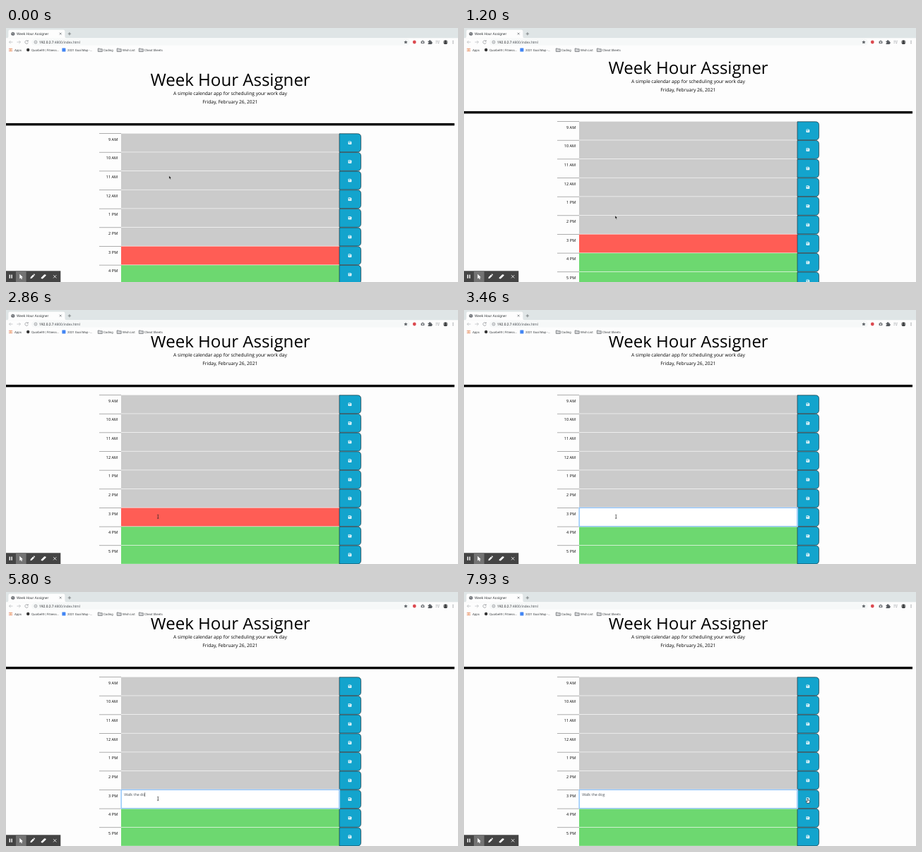
Write an HTML page that moves like this. It is 640 px wide and 360 px high and loops after 8 s.

```html
<!DOCTYPE html>
<html lang="en">
<head>
<meta charset="utf-8">
<title>Week Hour Assigner</title>
<style>
html, body { margin: 0; width: 100%; height: 100%; overflow: hidden; background: #fdfdfd; }
svg { display: block; width: 640px; height: 360px; }
text { font-family: "Open Sans", "Noto Sans", sans-serif; text-rendering: geometricPrecision; white-space: pre; }
#bar text { font-family: Roboto, Inter, sans-serif; fill: #3c4043; }
.mid { text-anchor: middle; }
.end { text-anchor: end; }
.ico { fill: none; stroke: #5f6368; stroke-width: .7; }
.pale { stroke: #b4b6b9; }
</style>
</head>
<body>
<svg viewBox="0 0 640 360">
  <g id="page"></g>
  <g id="bar"></g>
  <g id="tools"></g>
  <g id="mouse">
    <path id="arrow" d="M0 0V4.9L1.1 3.9 1.9 5.7 2.8 5.3 2 3.6H3.5Z" fill="#111" stroke="#fff" stroke-width=".4"/>
    <path id="beam" d="M-1.1-2.7Q0-2.7 0-2V2Q0 2.7-1.1 2.7M1.1-2.7Q0-2.7 0-2M0 2Q0 2.7 1.1 2.7M-.6.8H.6" fill="none" stroke="#222" stroke-width=".6"/>
    <path id="hand" d="M-.6 0Q0-.7.6 0V2L2.7 2.6Q3.2 2.9 3 3.8L2.3 6H-1L-2.6 3.6Q-2.4 2.8-1.6 3.2L-.6 4Z" fill="#fff" stroke="#111" stroke-width=".6"/>
  </g>
</svg>
<script>
const $ = id => document.getElementById(id);
const LOOP = 8000, TICK = 1000 / 15;
const TOP = 149.2, PITCH = 26.65, ACTIVE = 6;
const HOURS = ["9 AM", "10 AM", "11 AM", "12 AM", "1 PM", "2 PM", "3 PM", "4 PM", "5 PM"];
const NAME = "Week Hour Assigner";

const text = (x, y, size, str, extra = "") =>
  `<text x="${x}" y="${y}" font-size="${size}" ${extra}>${str}</text>`;
const rect = (x, y, w, h, fill, extra = "") =>
  `<rect x="${x}" y="${y}" width="${w}" height="${h}" fill="${fill}" ${extra}/>`;
const dot = (x, y, r, fill) => `<circle cx="${x}" cy="${y}" r="${r}" fill="${fill}"/>`;
const icon = (d, extra = "") => `<path class="ico" d="${d}" ${extra}/>`;
const paleIcon = d => `<path class="ico pale" d="${d}"/>`;

function row(label, i) {
  const y = TOP + PITCH * i, mid = y + 13.5;
  const color = i < ACTIVE ? "#cbcbcb" : i === ACTIVE ? "#ff5d55" : "#6dd870";
  return `<g>${rect(132, y, 31, .7, "#8c8c8c")}
    ${text(158.2, y + 10.6, 5.6, label, 'class="end"')}
    ${rect(163, y + .4, 309, 26, color, i === ACTIVE ? 'id="field"' : "")}
    <path d="M472 ${y + .6}h25.6q5 0 5 5v15.9q0 5-5 5h-25.6z" fill="#13a4cd" stroke="#22343b" stroke-width=".7"/>
    <g transform="translate(484.6 ${mid - 2.3})"><path d="M.5 0H3.4L4.6 1.2V4.1Q4.6 4.6 4.1 4.6H.5Q0 4.6 0 4.1V.5Q0 0 .5 0Z" fill="#fff"/>
    ${rect(.7, .7, 2.4, 1.1, "#13a4cd")}${dot(2.3, 3.1, .65, "#13a4cd")}</g></g>`;
}

const fieldY = TOP + PITCH * ACTIVE;
$("page").innerHTML =
  text(317.6, 82, 24.05, NAME, 'class="mid"') +
  text(317.5, 95.2, 6.68, "A simple calendar app for scheduling your work day", 'class="mid"') +
  text(317.3, 107.2, 6.68, "Friday, February 26, 2021", 'class="mid"') +
  rect(0, 134.9, 635, 3.4, "#000") +
  HOURS.map(row).join("") +
  `<g id="focus">${rect(162.9, fieldY + .2, 309.2, 26.4, "none", 'stroke="#bfdeff" stroke-width="1.6"')}
   ${rect(163.3, fieldY + .5, 308.4, 25.8, "#fff", 'stroke="#6fb3f5" stroke-width=".7"')}</g>` +
  text(167.2, 318, 5.34, "", 'id="entry" fill="#495057"') +
  rect(0, 313.2, .6, 5.9, "#222", 'id="caret"');

const folder = x => icon(`M${x - 3} 29h2.2l.8.8h3v3.6h-6z`, 'style="fill:#d5d6d8"');
let grid = "";
for (let i = 0; i < 9; i++)
  grid += rect(4.4 + i % 3 * 1.6, 28.9 + (i / 3 | 0) * 1.6, 1.1, 1.1, i % 2 ? "#e8a33d" : "#e2574c");

$("bar").innerHTML =
  rect(0, 0, 640, 14.5, "#dfe5e6") +
  `<path d="M1 14.6Q3.4 14.4 3.4 12V5Q3.4 2.6 5.8 2.6H81Q83.4 2.6 83.4 5V12Q83.4 14.4 85.8 14.6Z" fill="#fdfdfd"/>` +
  dot(9.8, 8.2, 2.5, "#5f6368") +
  icon("M8 7.4h2l.6 1.4-1.4 1.2M10.5 6.2l1 1.1", 'style="stroke:#fff;stroke-width:.5"') +
  text(15, 10, 5, NAME) +
  icon("M75.8 6.7l2.8 2.8m0-2.8l-2.8 2.8M87.7 8.2h4.4M89.9 6v4.4") +
  rect(0, 14.5, 640, 22.5, "#fdfdfd") +
  rect(36, 15.6, 536, 9, "#f6f8f8", 'rx="4.5"') +
  paleIcon("M9.5 20h-5m2.1-2.1L4.5 20l2.1 2.1") +
  paleIcon("M15.5 20h5m-2.1-2.1l2.1 2.1-2.1 2.1") +
  icon("M31 18.6A2.3 2.3 0 1 0 31.4 20.6M31.3 17.2v1.7h-1.8", 'style="stroke:#8a8d91"') +
  icon("M44 20a2 2 0 1 1-4 0a2 2 0 1 1 4 0M42 19.7v1.4M42 18.7v.4", 'style="stroke-width:.5"') +
  text(47, 21.8, 4.95, '192.0.2.7<tspan fill="#55595e">:4800/index.html</tspan>', 'style="fill:#202124"') +
  `<path d="M566 17.4l.8 1.7 1.8.2-1.3 1.2.4 1.8-1.7-.9-1.7.9.4-1.8-1.3-1.2 1.8-.2z" fill="#5f6368"/>` +
  dot(578.3, 20, 2.4, "#dc4a50") +
  rect(587.6, 18.4, 4.8, 3.6, "#6a6e73", 'rx=".6"') + rect(589, 17.7, 2, 1, "#6a6e73") + dot(590, 20.2, 1, "#fdfdfd") +
  `<path d="M597.6 18.4h1.6q0-1.3 1-1.3t1 1.3h1.6v1.5q1.1 0 1.1 1t-1.1 1v1.1h-5.2v-1.4q1.2 0 1.2-.8t-1.2-.8z" fill="#55595e"/>` +
  paleIcon("M608.4 18.2h3.4M608.4 19.8h3.4M608.4 21.4h1.6M612.9 21.4V18.2h1.2") + dot(612.2, 21.5, .8, "#b4b6b9") +
  dot(622.3, 20, 3.1, "#8b8c8c") + `<path d="M619.9 22q.4-1.6 1.5-1.6a1.4 1.6 0 1 1 1.8 0q1.4.1 1.6 1.6-2.4 2-4.9 0z" fill="#3c3e40"/>` +
  [18.2, 20, 21.8].map(y => dot(633, y, .55, "#5f6368")).join("") +
  grid +
  dot(31.2, 31, 2.2, "#333") +
  rect(79.4, 28.5, 5, 5, "#4285f4", 'rx=".5"') +
  [133.3, 160.2, 191.3].map(folder).join("") +
  [[12, "Apps"], [36, "Quorbel® | Fitness..."], [87, "2021 Goal Map -..."], [138, "Coding"], [165, "Wish List"], [196, "Cheat Sheets"]]
    .map(([x, s]) => text(x, 32.7, 4.35, s)).join("");

$("tools").innerHTML =
  rect(0, 344.3, 77.3, 15.7, "#444") +
  rect(14, 344.3, 14.6, 15.7, "#737373") +
  rect(4.6, 349.6, 1.4, 5.2, "#fff") + rect(7.4, 349.6, 1.4, 5.2, "#fff") +
  `<g fill="#fff"><path d="M19.3 348.8v6.6l1.6-1.3 1 2.2 1.1-.5-1-2.2h2z"/>
   <path d="M34.4 355.2l.5-2.1 3.5-3.5 1.6 1.6-3.5 3.5zM38.9 349.1l.5-.5q.5-.3.9.1l.6.6q.4.4 0 .9l-.5.5z"/>
   <path d="M49.8 353.7l4.2-4.2q.4-.4 1-.3l1.4.5q.7.4.1 1.2l-4.1 4.2q-.5.5-1.1.3l-1.3-.5q-.9-.4-.2-1.2z"/></g>` +
  `<path d="M67.1 350.2l4.2 4.2m0-4.2l-4.2 4.2" stroke="#fff" stroke-width=".8"/>`;

// Each step: time, then values.
const scroll = [[1000, 0], [1067, 1.67], [1133, 8], [1200, 17], [1267, 24], [1333, 28], [1400, 29]];
const moves = [
  [0, 230.8, 209.2], [150, 226, 224], [300, 219.5, 246], [450, 215.2, 261], [600, 213.9, 265.7],
  [1600, 213.9, 265.7], [1880, 213.6, 281], [2133, 213.2, 293.6],
  [2400, 213.2, 293.6], [2467, 214.8, 293.2], [2800, 214.8, 293.2], [2867, 215.3, 293],
  [7067, 215.3, 293], [7250, 245, 292], [7450, 345, 291], [7650, 448, 292], [7800, 483, 293], [7933, 486.7, 293.3]
];
const phrase = "Walk the dog";
const keys = [4460, 4730, 4800, 4930, 5130, 5200, 5330, 5460, 5530, 5660, 5800, 6000];
const FOCUS = 2960;

function at(steps, t, col) {
  const i = steps.findIndex(s => s[0] > t);
  if (i === 0) return steps[0][col];
  if (i < 0) return steps[steps.length - 1][col];
  const a = steps[i - 1], b = steps[i];
  return a[col] + (b[col] - a[col]) * (t - a[0]) / (b[0] - a[0]);
}
const show = (id, on) => $(id).setAttribute("visibility", on ? "visible" : "hidden");

function draw(time) {
  const t = Math.min(119, Math.floor((time + 6.8) / TICK)) * TICK;
  $("page").setAttribute("transform", `translate(0 ${-at(scroll, t, 1)})`);

  const focused = t >= FOCUS + 20;
  show("focus", focused);
  $("focus").setAttribute("stroke-opacity", Math.max(0, Math.min(1, (t - FOCUS) / 200)));
  show("field", !focused);

  const count = keys.filter(k => k <= t).length;
  $("entry").textContent = phrase.slice(0, count);
  const since = t - (count ? keys[count - 1] : FOCUS);
  show("caret", focused && since % 1000 < 500);
  $("caret").setAttribute("x", 167.1 + (count ? $("entry").getComputedTextLength() : 0));

  const x = at(moves, t, 1), y = at(moves, t, 2);
  $("mouse").setAttribute("transform", `translate(${x} ${y})`);
  const kind = t < 2399 ? "arrow" : x < 472 ? "beam" : "hand";
  for (const id of ["arrow", "beam", "hand"]) show(id, id === kind);
}

const start = performance.now();
function loop() {
  draw((performance.now() - start) % LOOP);
  requestAnimationFrame(loop);
}
loop();
</script>
</body>
</html>
```
